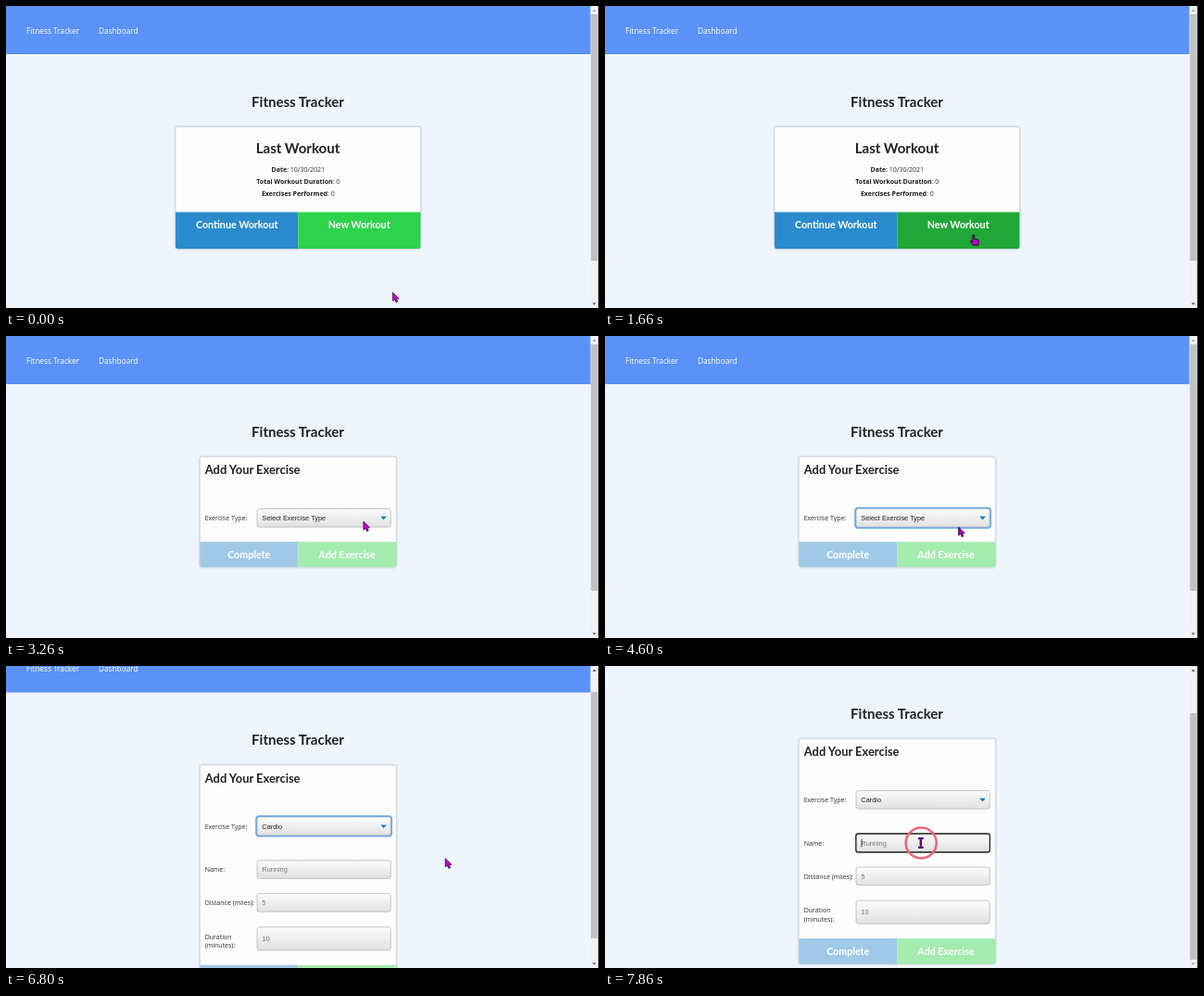
Recreate the animation shown at these times as an HTML page. Size 640 px wide and 326 px high, loop 8000 ms.

```html
<!DOCTYPE html>
<html lang="en">
<head>
<meta charset="utf-8">
<title>Fitness Tracker</title>
<style>
html, body { margin: 0; width: 100%; height: 100%; overflow: hidden; background: #eef5fd; }
svg { display: block; width: 100%; height: 100%; }
.body { font: 7px "Open Sans", "Noto Sans", sans-serif; fill: #2d2d2d; }
.nav { font: 8.25px "Open Sans", "Noto Sans", sans-serif; fill: #fff; }
.h1, .h2, .btn { font: 700 15px Lato, sans-serif; fill: #202122; }
.h2 { font-size: 12.9px; }
.btn { font-size: 10.7px; fill: #fff; }
.field { font: 7.4px "Liberation Sans", Arial, sans-serif; fill: #757575; }
.mid { text-anchor: middle; }
.bold { font-weight: 700; fill: #1c1c1c; }
.box { fill: url(#shade); stroke: #b0b0b0; stroke-width: .7; }
.card { fill: #fdfdfe; stroke: #d2d5da; stroke-width: .7; filter: drop-shadow(0 .8px .8px rgba(0, 0, 0, .22)); }
</style>
</head>
<body>
<svg viewBox="0 0 640 326" preserveAspectRatio="none">
  <defs>
    <linearGradient id="shade" x2="0" y2="1">
      <stop stop-color="#fcfcfc"/><stop offset="1" stop-color="#e1e1e1"/>
    </linearGradient>
    <clipPath id="homeClip"><rect x="183" y="130.5" width="264.5" height="131.5" rx="2.2"/></clipPath>
    <clipPath id="formClip"><rect id="formEdge" x="209.3" y="130.5" width="212" rx="2.2"/></clipPath>
  </defs>
  <rect width="640" height="326" fill="#eef5fd"/>

  <g id="page">
    <rect width="631" height="52" fill="#5a92f8"/>
    <text class="nav" x="22" y="29.6">Fitness Tracker</text>
    <text class="nav" x="100" y="29.6">Dashboard</text>
    <text class="h1 mid" x="315" y="108.9">Fitness Tracker</text>

    <g id="home">
      <rect class="card" x="183" y="130.5" width="264.5" height="131.5" rx="2.2"/>
      <text class="h1 mid" x="315" y="159.2">Last Workout</text>
      <g class="body mid">
        <text x="315.3" y="178.9"><tspan class="bold">Date</tspan>: 10/30/2021</text>
        <text x="315.3" y="191.5"><tspan class="bold">Total Workout Duration</tspan>: 0</text>
        <text x="315.3" y="204.5"><tspan class="bold">Exercises Performed</tspan>: 0</text>
      </g>
      <g clip-path="url(#homeClip)">
        <rect x="183" y="222.5" width="132.3" height="40" fill="#298bcc"/>
        <rect id="newBtn" x="315.3" y="222.5" width="132.3" height="40"/>
      </g>
      <text class="btn mid" x="249.2" y="240.2">Continue Workout</text>
      <text class="btn mid" x="381.2" y="240.2">New Workout</text>
    </g>

    <g id="form">
      <rect id="formCard" class="card" x="209.3" y="130.5" width="212" rx="2.2"/>
      <text class="h2" x="214.8" y="149.3">Add Your Exercise</text>
      <text class="body" x="214.7" y="199.4">Exercise Type:</text>
      <rect id="selectGlow" x="270.2" y="185.7" width="145.8" height="21.3" rx="3" fill="none" stroke="#67a8ea" stroke-width="2"/>
      <rect class="box" x="271" y="186.5" width="144.2" height="19.7" rx="2.5"/>
      <text id="choice" class="field" x="276.3" y="199.2" style="fill:#222"></text>
      <path d="M404.2 194.8h6.6l-3.3 3.6z" fill="#0c7fb4"/>

      <g id="cardio">
        <g class="body">
          <text x="214.7" y="245.7">Name:</text>
          <text x="214.7" y="281.7">Distance (miles):</text>
          <text x="214.7" y="318">Duration</text>
          <text x="214.7" y="327.6">(minutes):</text>
        </g>
        <rect class="box" x="271" y="233.2" width="144.2" height="19.6" rx="2.5"/>
        <rect class="box" x="271" y="269" width="144.2" height="19.6" rx="2.5"/>
        <rect class="box" x="271" y="305.2" width="144.2" height="25" rx="2.5"/>
        <g class="field">
          <text x="276.3" y="245.6">Running</text>
          <text x="276.3" y="281.5">5</text>
          <text x="276.3" y="320.2">10</text>
        </g>
        <g id="nameFocus" fill="none" stroke="#262626">
          <rect x="270.8" y="233" width="144.6" height="20" rx="2.6" stroke-width="1.3"/>
          <path d="M277 238.8v8.6" stroke-width=".8"/>
        </g>
      </g>

      <g clip-path="url(#formClip)">
        <g id="actions">
          <rect x="209" y="222.2" width="106.3" height="28" fill="#a0c9e6"/>
          <rect x="315.3" y="222.2" width="106.3" height="28" fill="#a3ecae"/>
          <text class="btn mid" x="262.2" y="240.2">Complete</text>
          <text class="btn mid" x="368" y="240.2">Add Exercise</text>
        </g>
      </g>
    </g>
  </g>

  <rect x="630.7" width="9.3" height="326" fill="#f1f1f1"/>
  <rect id="thumb" x="631.3" width="7.2" height="266" fill="#c1c1c1"/>
  <path id="up" d="M632.9 5.8h4l-2-2.4z"/>
  <path id="down" d="M632.9 320.4h4l-2 2.4z"/>
  <rect x="639" width="1" height="326" fill="#4a4a4a"/>

  <circle id="ring" fill="none" stroke="#ee6479" stroke-width="2.5"/>
  <g id="cursor" stroke-linejoin="round">
    <path id="arrow" d="M.4 .3V9.4L2.5 7.5L4 10.9L5.7 10.1L4.3 6.9H7.1Z" stroke="#2b0838" stroke-width=".8"/>
    <path id="hand" d="M-.9 .4Q0-.6.9.4V4.4L5 5.4Q5.9 5.8 5.8 7L5.1 11.2H-.4L-3.4 7.4Q-3.6 6-2.3 6.2L-.9 7.3Z" fill="#bd00d0" stroke="#1c0524" stroke-width=".9"/>
    <g id="beam" fill="none">
      <path d="M-2.8-4.9H2.8M0-4.9V4.9M-2.8 4.9H2.8" stroke="#2b0838" stroke-width="2.3"/>
      <path d="M-2.6-4.9H2.6M0-4.9V4.9M-2.6 4.9H2.6" stroke="#8a1ca8" stroke-width=".9"/>
    </g>
  </g>
</svg>
<script>
const LOOP = 8000;
const OPEN_FORM = 2200, PICK_SELECT = 3460, EXPAND = 6000, PICK_NAME = 7760;
const CLICKS = [1800, PICK_SELECT, PICK_NAME];

// Each key is [time, ...values].
const PATH = [
  [60, 417, 309], [1000, 397.8, 247], [2200, 397.8, 247], [3200, 385.5, 200],
  [3600, 385.5, 200], [4200, 385, 228], [4599, 385, 228], [4600, 381.2, 206],
  [5999, 381.2, 206], [6000, 367.2, 247.3], [6200, 367.2, 247.3],
  [6700, 473.8, 207.5], [7060, 473.8, 207.5], [7600, 340.8, 191]
];
const SCROLL = [[6600, 0], [6800, 23.4], [6860, 32], [7000, 47], [7060, 52]];

const el = {};
document.querySelectorAll('[id]').forEach(n => el[n.id] = n);
const set = (id, attrs) => {
  for (const k in attrs) el[id].setAttribute(k, attrs[k]);
};
const show = (id, on) => { el[id].style.display = on ? '' : 'none'; };
const smooth = u => u * u * (3 - 2 * u);

function track(keys, t, ease = u => u) {
  if (t <= keys[0][0]) return keys[0].slice(1);
  const i = keys.findIndex(k => k[0] > t);
  if (i < 0) return keys[keys.length - 1].slice(1);
  const a = keys[i - 1], b = keys[i];
  const u = ease((t - a[0]) / (b[0] - a[0]));
  return a.slice(1).map((v, j) => v + (b[j + 1] - v) * u);
}

function step(t) {
  const base = Math.floor(t / 200) * 200;
  return t - base < 60 ? base : base + 60;
}

function drawCursor(t, x, y, scroll, overNew) {
  const py = y + scroll;
  const inField = x > 271 && x < 415 &&
    [[233, 253], [269, 289], [305, 330]].some(([a, b]) => py > a && py < b);
  const beam = t > EXPAND + 200 && inField;
  show('hand', overNew);
  show('beam', beam);
  show('arrow', !overNew && !beam);
  set('arrow', { fill: t >= 4600 && t <= 6200 ? '#a400b4' : '#cc00e0' });
  set('cursor', { transform: `translate(${x} ${y})` });

  const age = t - CLICKS.filter(c => c <= t).pop();
  show('ring', age < 260);
  if (age < 260) {
    const r = 6 + 10.5 * Math.min(1, age / 100);
    set('ring', { cx: x + .4, cy: y + (overNew ? 2 : 0), r });
  }
}

function draw(t) {
  const [x, y] = track(PATH, t, smooth);
  const [scroll] = track(SCROLL, t);
  const home = t < OPEN_FORM, wide = t >= EXPAND;
  const overNew = home && y < 262;

  set('page', { transform: `translate(0 ${-scroll})` });
  show('home', home);
  show('form', !home);
  set('newBtn', { fill: overNew ? '#21a737' : '#2dd34a' });

  const height = wide ? 243 : 119;
  set('formCard', { height });
  set('formEdge', { height });
  set('actions', { transform: `translate(0 ${wide ? 124 : 0})` });
  show('cardio', wide);
  show('selectGlow', t >= PICK_SELECT && t < PICK_NAME);
  show('nameFocus', t >= PICK_NAME);
  el.choice.textContent = wide ? 'Cardio' : 'Select Exercise Type';

  set('thumb', { y: 9 + scroll * 42 / 52 });
  set('up', { fill: scroll > 0 ? '#505050' : '#a3a3a3' });
  set('down', { fill: scroll < 52 ? '#505050' : '#a3a3a3' });
  drawCursor(t, x, y, scroll, overNew);
}

const start = performance.now();
function tick() {
  draw(step((performance.now() - start) % LOOP));
  requestAnimationFrame(tick);
}
tick();
</script>
</body>
</html>
```
